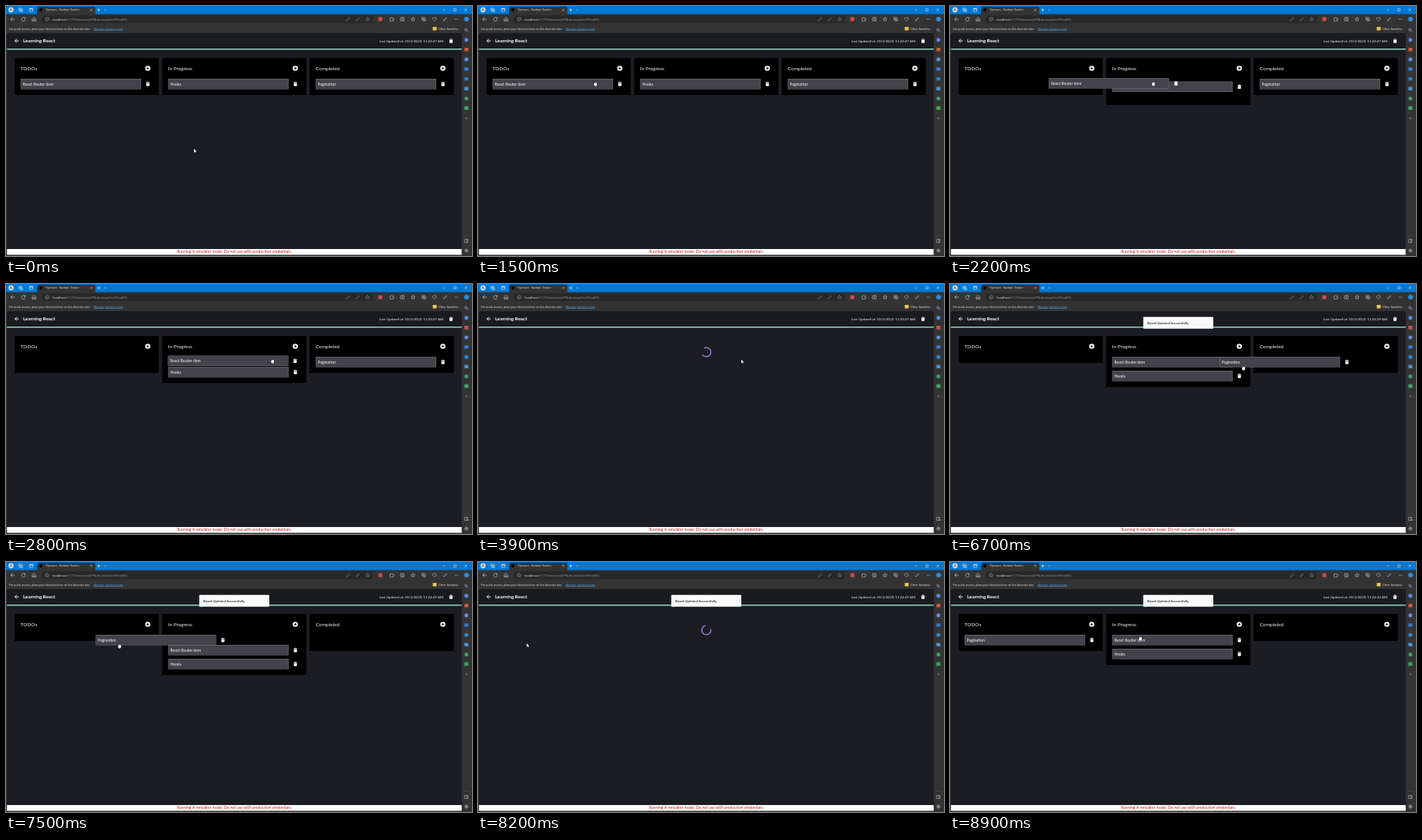
An HTML page with a canvas that plays this animation: 600 px wide and 323 px high, repeating every 9 s.

```html
<!DOCTYPE html>
<html lang="en">
<head>
<meta charset="utf-8">
<title>Kanban board</title>
<style>
html, body { margin: 0; width: 100%; height: 100%; overflow: hidden; background: #333; }
canvas { display: block; width: 600px; height: 323px; }
</style>
</head>
<body>
<canvas id="stage"></canvas>
<script>
const W = 600, H = 323, LOOP = 9000, STEP = 100;
const UI = '"Open Sans", "Noto Sans", sans-serif';
const APP = 'Lato, sans-serif';
const canvas = document.getElementById('stage');
const ctx = canvas.getContext('2d');
const dpr = window.devicePixelRatio || 1;
canvas.width = W * dpr;
canvas.height = H * dpr;

const clamp = v => Math.max(0, Math.min(1, v));
const mix = (a, b, k) => a + (b - a) * k;
const smooth = k => k * k * (3 - 2 * k);

function rect(x, y, w, h, fill, r = 0) {
  ctx.fillStyle = fill;
  ctx.beginPath();
  ctx.roundRect(x, y, w, h, r);
  ctx.fill();
}
function disc(x, y, r, fill) {
  ctx.fillStyle = fill;
  ctx.beginPath();
  ctx.arc(x, y, r, 0, 7);
  ctx.fill();
}
// Text centred vertically on y
function text(s, x, y, size, fill, font = APP, weight = 400, align = 'left') {
  ctx.font = `${weight} ${size}px ${font}`;
  ctx.fillStyle = fill;
  ctx.textAlign = align;
  ctx.fillText(s, x, y + size * 0.35);
}
// Path data drawn around (x, y)
function stroke(d, x, y, color = '#ccc', width = 0.6) {
  ctx.save();
  ctx.translate(x, y);
  ctx.strokeStyle = color;
  ctx.lineWidth = width;
  ctx.stroke(new Path2D(d));
  ctx.restore();
}
function shape(d, x, y, fill, edge) {
  ctx.save();
  ctx.translate(x, y);
  const p = new Path2D(d);
  if (edge) {
    ctx.strokeStyle = edge;
    ctx.lineWidth = 0.8;
    ctx.stroke(p);
  }
  ctx.fillStyle = fill;
  ctx.fill(p);
  ctx.restore();
}

const ICON = {
  back: 'M2.5 0H-2.5M0-2.5L-2.5 0L0 2.5',
  reload: 'M2-1.2A2.4 2.4 0 1 0 2.4 .4M2.3-2.5V-.9H.7',
  home: 'M-2.3-.3L0-2.5L2.3-.3V2.4H.7V.6H-.7V2.4H-2.3Z',
  star: 'M0-2.5L.7-.8L2.5-.7L1.1.5L1.6 2.3L0 1.3L-1.6 2.3L-1.1.5L-2.5-.7L-.7-.8Z',
  plus: 'M-2 0H2M0-2V2',
  cross: 'M-1.5-1.5L1.5 1.5M1.5-1.5L-1.5 1.5',
  box: 'M-2-2H2V2H-2Z',
  split: 'M-2.3-2H2.3V2H-2.3ZM0-2.4V2.4',
  puzzle: 'M-2-1.4H-.7A.7.7 0 1 1 .7-1.4H2V0A.7.7 0 1 1 2 1V2.4H-2Z',
  stack: 'M-2.3-2.2H1.2V1.2H-2.3ZM-.8 2.3H2.3V-.8M-.6-1.5V.5M-1.6-.5H.4',
  heart: 'M0 2.3L-2.3 0A1.3 1.3 0 0 1 0-1.5A1.3 1.3 0 0 1 2.3 0Z',
  pen: 'M-2 2L-1.4.4L1.1-2.1L2.1-1.1L-.4 1.4Z',
  search: 'M1-.4A1.5 1.5 0 1 1-2-.4A1.5 1.5 0 1 1 1-.4M.7.8L2.3 2.3',
  chevron: 'M-1.2-.5L0 .6L1.2-.5'
};

function browser() {
  rect(0, 0, W, H, '#333333');
  rect(0, 0, W, 10.5, '#0078d4');
  disc(6.5, 5, 3.2, '#f2f4f7');
  disc(6.5, 4.2, 1.1, '#3b5f8a');
  stroke('M-1.8 1A1.8 1.6 0 0 1 1.8 1', 6.5, 6, '#3b5f8a', 0.8);
  stroke(ICON.stack, 19, 5, '#e8f2fb');
  stroke(ICON.box, 32.5, 5, '#e8f2fb');
  stroke('M-2-1.2H2', 32.5, 5, '#e8f2fb', 1);
  rect(40, 0.8, 75, 11, '#333333', [2, 2, 0, 0]);
  rect(43, 3, 4, 4, '#0a0a0a');
  text('Tavmuro - Kanban Tracker', 51, 5, 3.6, '#f0f0f0', UI);
  stroke(ICON.cross, 109.8, 5, '#ddd', 0.5);
  stroke(ICON.plus, 119.5, 5, '#fff', 0.6);
  stroke(ICON.chevron, 128, 5, '#fff', 0.5);
  stroke('M-1.6 0H1.6', 564, 5, '#fff', 0.5);
  stroke('M-1.4-1.4H1.4V1.4H-1.4Z', 578, 5, '#fff', 0.5);
  stroke(ICON.cross, 592, 5, '#fff', 0.5);

  stroke(ICON.back, 8.5, 17, '#ddd');
  stroke(ICON.reload, 22.5, 17, '#ddd');
  stroke(ICON.home, 36, 17, '#ddd');
  rect(46, 12, 426, 10, '#282828', 2);
  stroke('M2.2 0A2.2 2.2 0 1 1-2.2 0A2.2 2.2 0 1 1 2.2 0M0-.4V1.2M0-1.3V-.8', 53, 17, '#bbb', 0.5);
  text('localhost', 60, 17, 4.35, '#f5f5f5', UI);
  const host = ctx.measureText('localhost').width;
  text(':5173/boards/pPNtdsLnaqGmFFvlaIDG', 60 + host, 17, 4.35, '#9a9a9a', UI);
  stroke(ICON.pen, 440.5, 17, '#888', 0.5);
  stroke(ICON.pen, 453, 17, '#888', 0.5);
  stroke(ICON.star, 465.5, 17, '#999', 0.5);
  rect(479.5, 14.5, 5, 5, '#d94848', 0.6);
  ['puzzle', 'split', 'star', 'stack', 'heart', 'pen'].forEach((name, i) =>
    stroke(ICON[name], 496.5 + i * 13.8, 17, '#d0d0d0', 0.55));
  for (let i = -1; i <= 1; i++) disc(580 + i * 1.8, 17, 0.5, '#ddd');

  text('For quick access, place your favorites here on the favorites bar.', 4, 29.4, 3.57, '#f4f4f4', UI);
  text('Manage favorites now', 113, 29.4, 3.65, '#4aa3ea', UI);
  rect(113, 31.5, 38, 0.4, '#4aa3ea');
  rect(549.5, 27, 5, 4.4, '#f0c64c', 0.5);
  text('Other favorites', 557, 29.4, 3.6, '#f4f4f4', UI);

  disc(593, 17, 3, '#2c8fe0');
  stroke(ICON.search, 592.8, 31, '#a9a4e8', 0.8);
  ['#4f8df0', '#d9573c', '#5b8fe8', '#2f7be0', '#1f86d8', '#4a92d8', '#43a06b', '#3ba85b']
    .forEach((c, i) => i % 2 ? rect(590.3, 54 + (i - 1) * 12.6, 5, 4.6, c, 0.8)
                             : disc(592.8, 43.8 + i * 12.6, 2.5, c));
  stroke(ICON.plus, 592.8, 145, '#999', 0.5);
  rect(589, 296, 8, 0.4, '#555');
  stroke('M-2.2-2H2.2V2H-2.2ZM.6-2V2', 592.8, 303.5, '#ccc', 0.5);
  stroke('M2 0A2 2 0 1 1-2 0A2 2 0 1 1 2 0M.8 0A.8.8 0 1 1-.8 0A.8.8 0 1 1 .8 0', 592.8, 316, '#ccc', 0.6);
}

function trash(x, y) {
  shape('M-2.4-2.1H-1L-.6-2.7H.6L1 -2.1H2.4V-1.4H-2.4ZM-2-1H2V2.1Q2 2.8 1.3 2.8H-1.3Q-2 2.8-2 2.1Z', x, y, '#fff');
}

function page(stamp) {
  rect(1.2, 35, 585.5, 286.5, '#1c1d23', [2, 2, 0, 0]);
  rect(1.2, 35, 585.5, 20, '#1a1b1f', [2, 2, 0, 0]);
  rect(1.2, 55, 585.5, 1.5, '#8fd6bd');
  stroke(ICON.back, 14, 45, '#fff', 0.9);
  text('Learning React', 22, 45, 6.3, '#fff', APP, 700);
  text('Last Updated at: 10/3/2023, ' + stamp + ' AM', 563, 45, 4.4, '#f4f4f4', APP, 400, 'right');
  trash(573, 45);
  rect(1.2, 314, 585.5, 7.5, '#ffffff');
  text('Running in emulator mode. Do not use with production credentials.', 294, 317.7, 5.03, '#c92020', APP, 400, 'center');
}

const COLS = ['TODOs', 'In Progress', 'Completed'];
const colX = i => 11 + 190 * i;
const TOP = 94, PITCH = 18, HOLE = 13;

function column(i, count, hole) {
  const x = colX(i), h = (count ? 30 + PITCH * count : 35) + (hole ? HOLE : 0);
  rect(x, 67, 185.5, h, '#000');
  text(COLS[i], x + 7.8, 80.8, 6.4, '#f2f2f2');
  disc(x + 171.5, 80.5, 3.3, '#fff');
  stroke('M-1.8 0H1.8M0-1.8V1.8', x + 171.5, 80.5, '#000', 0.8);
}
function card(label, x, y) {
  rect(x, y, 155, 13.4, '#77777f');
  rect(x + 0.5, y + 0.5, 154, 12.4, '#434349');
  text(label, x + 2.8, y + 6.8, 5, '#fff');
  trash(x + 163.8, y + 6.7);
}
const slot = (c, row) => [colX(c) + 7.8, TOP + row * PITCH];

// time, x, y
const PATH = [
  [0, 242, 187], [400, 242, 187], [1300, 151, 101], [1500, 151, 101], [1700, 153.5, 101.5],
  [2600, 339, 100], [2800, 343, 100], [3400, 339, 100], [4000, 339, 100], [5000, 335, 106],
  [5300, 335, 106], [6200, 429.5, 109], [6400, 429.5, 109], [7500, 146, 109],
  [7800, 53, 109], [8100, 52, 108], [8800, 245, 99], [9000, 245, 99]
];
function pointer(t) {
  let i = 0;
  while (i < PATH.length - 2 && t >= PATH[i + 1][0]) i++;
  const [ta, xa, ya] = PATH[i], [tb, xb, yb] = PATH[i + 1];
  const k = smooth(clamp((t - ta) / (tb - ta)));
  return [mix(xa, xb, k), mix(ya, yb, k)];
}

// Follow the pointer from start, then settle into a slot after drop
function dragged(t, grabX, grabY, drop, end) {
  const [px, py] = pointer(Math.min(t, drop));
  const k = smooth(clamp((t - drop) / 300));
  return [mix(px - grabX, end[0], k), mix(py - grabY, end[1], k)];
}

function board(t) {
  const router = 'React Router dom', hooks = 'Hooks', paging = 'Pagination';
  if (t < 1700) {
    COLS.forEach((_, i) => column(i, 1));
    card(router, ...slot(0, 0));
    card(hooks, ...slot(1, 0));
    card(paging, ...slot(2, 0));
  } else if (t < 3200) {
    const [x, y] = dragged(t, 134.5, 7.5, 2900, slot(1, 0));
    const over = x + 86 > 201;
    column(0, 1);
    column(1, 1, over);
    column(2, 1);
    card(hooks, slot(1, 0)[0], TOP + HOLE * smooth(clamp((x - 115) / 35)));
    card(paging, ...slot(2, 0));
    card(router, x, y);
  } else if (t < 6400) {
    column(0, 0);
    column(1, 2);
    column(2, 1);
    card(router, ...slot(1, 0));
    card(hooks, ...slot(1, 1));
    card(paging, ...slot(2, 0));
  } else if (t < 8200) {
    const [x, y] = dragged(t, 30.5, 15, 7900, slot(0, 0));
    const shift = HOLE * smooth(clamp((300 - x) / 40) * clamp((x - 80) / 35));
    column(0, 0, x + 86 < 196);
    column(1, 2, x < 300 && x + 86 > 196);
    column(2, 1);
    card(router, slot(1, 0)[0], TOP + shift);
    card(hooks, slot(1, 1)[0], TOP + PITCH + shift);
    card(paging, x, y);
  } else {
    column(0, 1);
    column(1, 2);
    column(2, 0);
    card(paging, ...slot(0, 0));
    card(router, ...slot(1, 0));
    card(hooks, ...slot(1, 1));
  }
}

function spinner(t) {
  const a = (t - 3900) / 1000 * Math.PI * 2 - 2.1;
  ctx.strokeStyle = '#a583e6';
  ctx.lineWidth = 1.3;
  ctx.beginPath();
  ctx.arc(294, 88, 5.9, a, a + 4.7);
  ctx.stroke();
}

function toast(t) {
  ctx.globalAlpha = clamp((t - 3900) / 200);
  rect(248.8, 42.5, 90.2, 15.2, '#fafafa', 0.6);
  text('Board Updated Successfully', 254, 50.1, 4.3, '#333', APP, 700);
  ctx.globalAlpha = 1;
}

function cursor(t, busy) {
  const [x, y] = pointer(t);
  const hand = !busy && t >= 1200 && !(t >= 5600 && t < 6000);
  if (hand) shape('M-2.3-.4L-1.2 0V-1.9Q-.8-2.5-.4-1.9Q0-2.8.5-1.9Q1-2.4 1.4-1.6Q2-1.8 2.1-1V1L1.3 2.5H-.8Z', x, y, '#fff', '#111');
  else shape('M0 0V4.6L1.1 3.7L1.8 5.2L2.6 4.8L1.9 3.4H3.3Z', x, y - 2.5, '#fff', '#111');
}

function draw(t) {
  ctx.setTransform(dpr, 0, 0, dpr, 0, 0);
  const busy = (t >= 3200 && t < 4000) || (t >= 8200 && t < 8700);
  browser();
  page(t < 4000 ? '11:23:27' : t < 8700 ? '11:24:29' : '11:24:33');
  if (busy) spinner(t);
  else board(t);
  if (t >= 4000) toast(t);
  cursor(t, busy);
}

const start = performance.now();
function tick() {
  const t = (performance.now() - start) % LOOP;
  draw(Math.floor(t / STEP) * STEP);
  requestAnimationFrame(tick);
}
tick();
</script>
</body>
</html>
```
